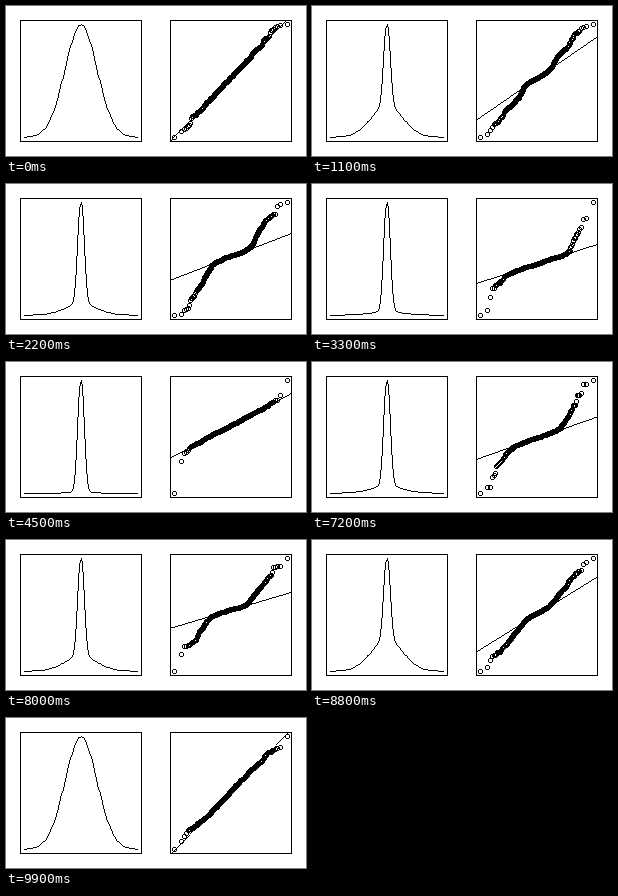
Recreate the animation shown at these times as a matplotlib script. Size 300 px wide and 150 px high, loop 10000 ms.

```python
import matplotlib.pyplot as plt
import numpy as np
from matplotlib.animation import FuncAnimation

W, H, DPI = 300, 150, 100
STEPS, INTERVAL = 100, 100
LEFT, RIGHT = 0, 150          # x offsets of the panels
BOX_LO, BOX_HI = 14, 135
LO, HI = 18.89, 131.11        # data area inside each box
N = 500
WIDE, NARROW = 1.0, 0.2       # standard deviations of the two parts


def pixel(v):
    return np.floor(np.asarray(v) + 1e-6).astype(int)


def rescale(v, start, end):
    return start + (v - v.min()) / (v.max() - v.min()) * (end - start)


def draw_line(canvas, xs, ys):
    """Hard-edged polyline, one pixel wide."""
    for x0, y0, x1, y1 in zip(xs, ys, xs[1:], ys[1:]):
        n = max(abs(x1 - x0), abs(y1 - y0)) + 1
        canvas[pixel(np.linspace(y0, y1, n) + 0.5),
               pixel(np.linspace(x0, x1, n) + 0.5)] = 0


def draw_rings(canvas, xs, ys):
    canvas[ys[:, None] + RING_Y, xs[:, None] + RING_X] = 0


def draw_trend(canvas, x, y):
    """Line through both quartiles, cut off at the box."""
    x1, x2 = np.quantile(x, [0.25, 0.75])
    y1, y2 = np.quantile(y, [0.75, 0.25])
    cols = np.arange(BOX_LO, BOX_HI + 1) + RIGHT
    rows = pixel(y1 + (cols + 0.5 - x1) * (y2 - y1) / (x2 - x1))
    inside = (rows >= BOX_LO) & (rows <= BOX_HI)
    canvas[rows[inside], cols[inside]] = 0


def normal_quantiles(n):
    z = np.linspace(-5, 5, 20001)
    cdf = np.cumsum(np.exp(-z ** 2 / 2))
    return np.interp((np.arange(n) + 0.5) / n, cdf / cdf[-1], z)


def wide_share(step):
    return 1 - np.sin(np.pi * step / (STEPS - 1))


def mixture_density(x, share):
    def bell(s):
        return np.exp(-(x / s) ** 2 / 2) / s
    return share * bell(WIDE) + (1 - share) * bell(NARROW)


def mixture_sample(step, share):
    rng = np.random.default_rng(step)
    scale = np.where(rng.random(N) < share, WIDE, NARROW)
    return np.sort(rng.normal(size=N) * scale)


grid = np.linspace(-3.5, 3.5, 101)
grid_x = pixel(rescale(grid, LO, HI)) + LEFT
qq_x = rescale(normal_quantiles(N), LO, HI) + RIGHT

turn = np.radians(np.arange(0, 360, 30))
RING_X = np.rint(2 * np.cos(turn)).astype(int)
RING_Y = np.rint(2 * np.sin(turn)).astype(int)

blank = np.ones((H, W))
for dx in (LEFT, RIGHT):
    draw_line(blank,
              [dx + BOX_LO, dx + BOX_HI, dx + BOX_HI, dx + BOX_LO, dx + BOX_LO],
              [BOX_LO, BOX_LO, BOX_HI, BOX_HI, BOX_LO])

fig = plt.figure(figsize=(W / DPI, H / DPI), dpi=DPI, facecolor="white")
ax = fig.add_axes([0, 0, 1, 1])
ax.axis("off")
image = ax.imshow(blank, cmap="gray", vmin=0, vmax=1, aspect="auto",
                  interpolation="nearest", extent=(0, W, H, 0))


def update(step):
    canvas = blank.copy()
    share = wide_share(step)

    density = mixture_density(grid, share)
    draw_line(canvas, grid_x, pixel(rescale(density, HI, LO)))

    y = rescale(mixture_sample(step, share), HI, LO)
    draw_rings(canvas, pixel(qq_x), pixel(y))
    draw_trend(canvas, qq_x, y)

    image.set_data(canvas)
    return (image,)


anim = FuncAnimation(fig, update, frames=STEPS, interval=INTERVAL, repeat=True)
plt.show()
```
